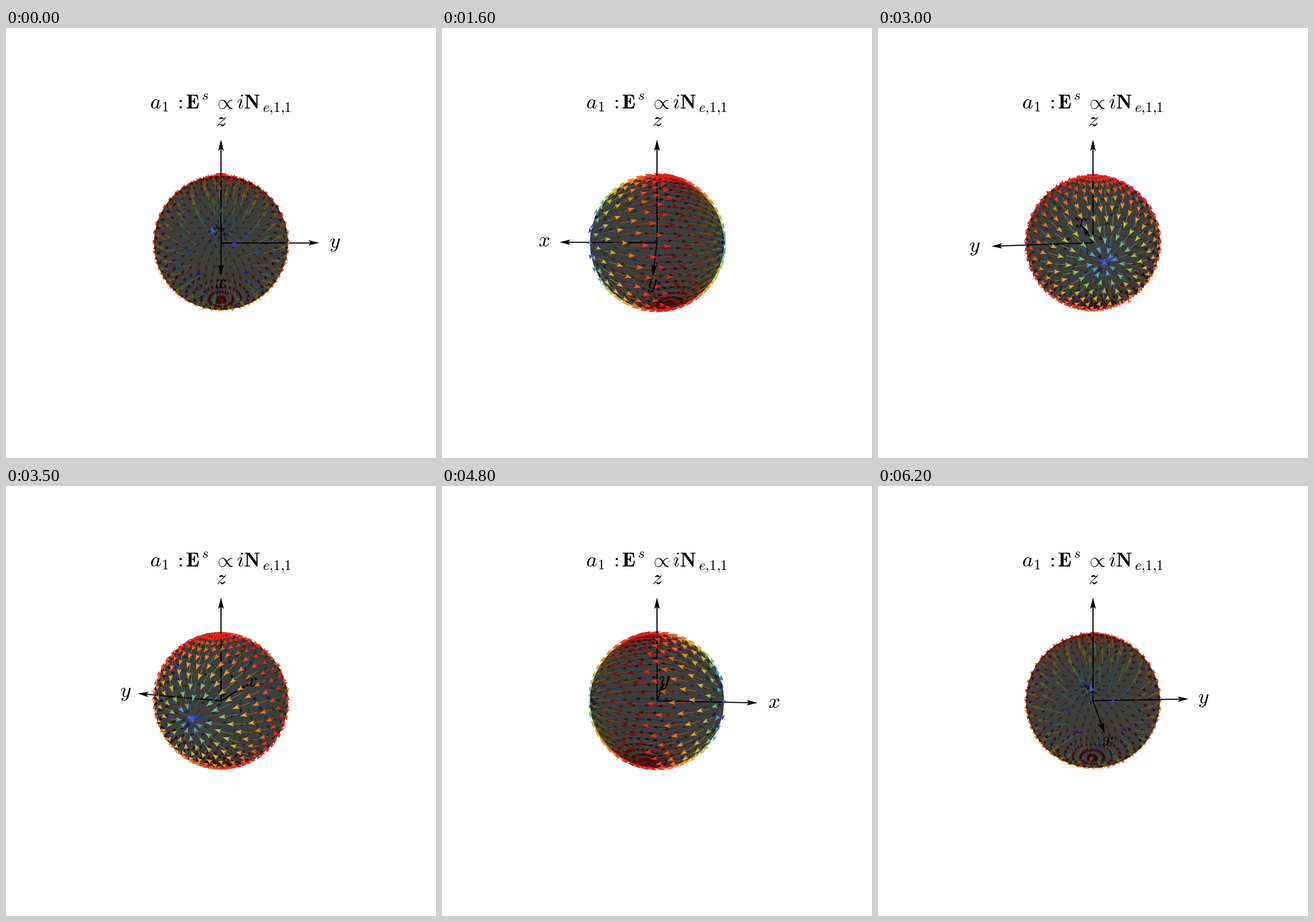
A matplotlib script for the animation above (6300 ms loop, 748 px wide and 748 px high).

```python
import numpy as np
import matplotlib.pyplot as plt
from matplotlib.animation import FuncAnimation
from matplotlib.collections import LineCollection, PolyCollection
from matplotlib.colors import LinearSegmentedColormap

SIZE, DPI = 748, 88
FRAMES, INTERVAL, STEP = 63, 100, 0.1
CX, CY = 374, 373.7
UNIT, DIST = 114, 4.92           # pixels per unit at the centre, camera distance
ELEV = np.arcsin(0.2345)
AXIS, LABEL = 1.5, 1.74
ROWS, COLS = 24, 24
LENGTH, HEAD, HALF = 0.25, 0.092, 0.029
EM = 36

plt.rcParams["mathtext.fontset"] = "cm"
RAINBOW = LinearSegmentedColormap.from_list("field", [
    (0.0, (0.47, 0.11, 0.53)), (0.12, (0.27, 0.24, 0.78)),
    (0.25, (0.27, 0.46, 0.84)), (0.38, (0.36, 0.66, 0.71)),
    (0.5, (0.51, 0.73, 0.46)), (0.64, (0.76, 0.75, 0.28)),
    (0.8, (0.91, 0.61, 0.20)), (0.91, (0.92, 0.40, 0.15)),
    (1.0, (0.88, 0.12, 0.12))])


def make_field():
    """Points on the unit sphere with the tangential dipole field along -x."""
    row, col = np.mgrid[:ROWS, :COLS]
    theta = np.pi * (row.ravel() + 0.5) / ROWS
    phi = 2 * np.pi * (col.ravel() + 0.38 * row.ravel()) / COLS
    pts = np.column_stack([np.sin(theta) * np.cos(phi),
                           np.sin(theta) * np.sin(phi), np.cos(theta)])
    vec = pts[:, :1] * pts - np.array([1.0, 0, 0])
    size = np.linalg.norm(vec, axis=1)
    vec /= np.maximum(size, 1e-6)[:, None]
    return pts, vec, RAINBOW(size)


TAILS, DIRS, COLORS = make_field()
TIPS = TAILS + LENGTH * DIRS


def camera(az):
    ce, se = np.cos(ELEV), np.sin(ELEV)
    view = np.array([ce * np.cos(az), ce * np.sin(az), se])
    right = np.array([-np.sin(az), np.cos(az), 0])
    return view, right, np.cross(view, right)


def project(pts, cam):
    view, right, up = cam
    scale = UNIT / (1 - pts @ view / DIST)
    xy = np.column_stack([CX + scale * (pts @ right), CY - scale * (pts @ up)])
    return xy, scale


def darts(tip, unit, length, half):
    """Arrowheads with a notched back."""
    side = np.column_stack([-unit[:, 1], unit[:, 0]]) * half[:, None]
    back = tip - unit * length[:, None]
    notch = tip - unit * length[:, None] * 0.78
    return np.stack([tip, back + side, notch, back - side], axis=1), notch


fig = plt.figure(figsize=(SIZE / DPI, SIZE / DPI), dpi=DPI, facecolor="white")
ax = fig.add_axes([0, 0, 1, 1])
ax.set_xlim(0, SIZE)
ax.set_ylim(SIZE, 0)
ax.axis("off")


def px(n):
    return n * 72 / DPI


def write(x, y, tex, em=EM, ha="left"):
    return ax.text(x, y, f"${tex}$", fontsize=px(em), ha=ha, va="baseline",
                   color="black", zorder=20)


def add_heads(z):
    return ax.add_collection(PolyCollection([], linewidths=0, zorder=z))


def add_lines(z, width, color=None):
    return ax.add_collection(LineCollection([], linewidths=px(width), colors=color,
                                            capstyle="butt", zorder=z))


write(250, 139.5, "a")
write(270, 145, "1", 25)
write(292, 139.5, ":")
write(312, 139.5, r"\mathbf{E}")
write(340, 125, "s", 25)
write(361, 139.5, r"\propto")
write(401, 139.5, "i")
write(413, 139.5, r"\mathbf{N}")
write(446, 146.5, "e{,}1{,}1", 25)

# The sphere is half-transparent black, seen as a far and a near wall.
RADIUS = UNIT / np.sqrt(1 - 1 / DIST ** 2)
for wall in (3, 7):
    ax.add_patch(plt.Circle((CX, CY), RADIUS, fc="black", ec="none",
                            alpha=0.5, zorder=wall))

far_lines, near_lines = add_lines(1, 0.6), add_lines(8, 0.75)
far_heads, dim_heads, lit_heads = add_heads(2), add_heads(6), add_heads(9)
axis_lines, axis_heads = add_lines(4, 1.9, "black"), add_heads(5)
front_lines, front_heads = add_lines(10, 1.9, "black"), add_heads(11)
for heads in (axis_heads, front_heads):
    heads.set_facecolor("black")
labels = [write(0, 0, name, ha="center") for name in "xyz"]


def show_heads(artist, verts, mask):
    artist.set_verts(verts[mask])
    artist.set_facecolor(COLORS[mask])


def draw_field(cam):
    view = cam[0]
    tail, _ = project(TAILS, cam)
    tip, scale = project(TIPS, cam)
    delta = tip - tail
    span = np.maximum(np.linalg.norm(delta, axis=1), 1e-6)
    fore = np.minimum(span / (LENGTH * scale), 1)
    size = scale * (0.6 + 0.4 * fore)
    verts, notch = darts(tip, delta / span[:, None], HEAD * size, HALF * scale)

    normal = TIPS / np.linalg.norm(TIPS, axis=1)[:, None]
    near = normal @ view > 1 / DIST
    sight = DIST * view - (TAILS + TIPS) / 2
    toward = (DIRS * sight).sum(axis=1) > 0
    show_heads(far_heads, verts, ~near)
    show_heads(dim_heads, verts, near & ~toward)
    show_heads(lit_heads, verts, near & toward)

    shaft = np.stack([tail, notch], axis=1)
    far_lines.set_segments(shaft[~near])
    far_lines.set_color(COLORS[~near])
    tint = COLORS.copy()
    tint[:, 3] = np.where(toward, 0.75, 0.5)
    near_lines.set_segments(shaft[near])
    near_lines.set_color(tint[near])


def draw_axes(cam):
    origin = np.array([CX, CY])
    tip, _ = project(AXIS * np.eye(3), cam)
    pole, _ = project(np.eye(3), cam)
    spot, _ = project(LABEL * np.eye(3), cam)
    delta = tip - origin
    unit = delta / np.linalg.norm(delta, axis=1)[:, None]
    verts, notch = darts(tip, unit, np.full(3, 19.0), np.full(3, 4.7))
    axis_lines.set_segments([[origin, end] for end in notch])
    axis_heads.set_verts(verts)

    # Parts outside the sphere on the viewer's side lie over the arrows.
    front = cam[0] > 1 / DIST
    reach = ((notch - pole) * unit).sum(axis=1) > 0
    front_lines.set_segments([[pole[k], notch[k]] for k in range(3)
                              if front[k] and reach[k]])
    front_heads.set_verts(verts[front])
    for text, (x, y) in zip(labels, spot):
        text.set_position((x, y + 8))


def update(frame):
    cam = camera(STEP * frame)
    draw_field(cam)
    draw_axes(cam)
    return []


anim = FuncAnimation(fig, update, frames=FRAMES, interval=INTERVAL,
                     init_func=lambda: update(0), repeat=True, repeat_delay=0)
plt.show()
```
